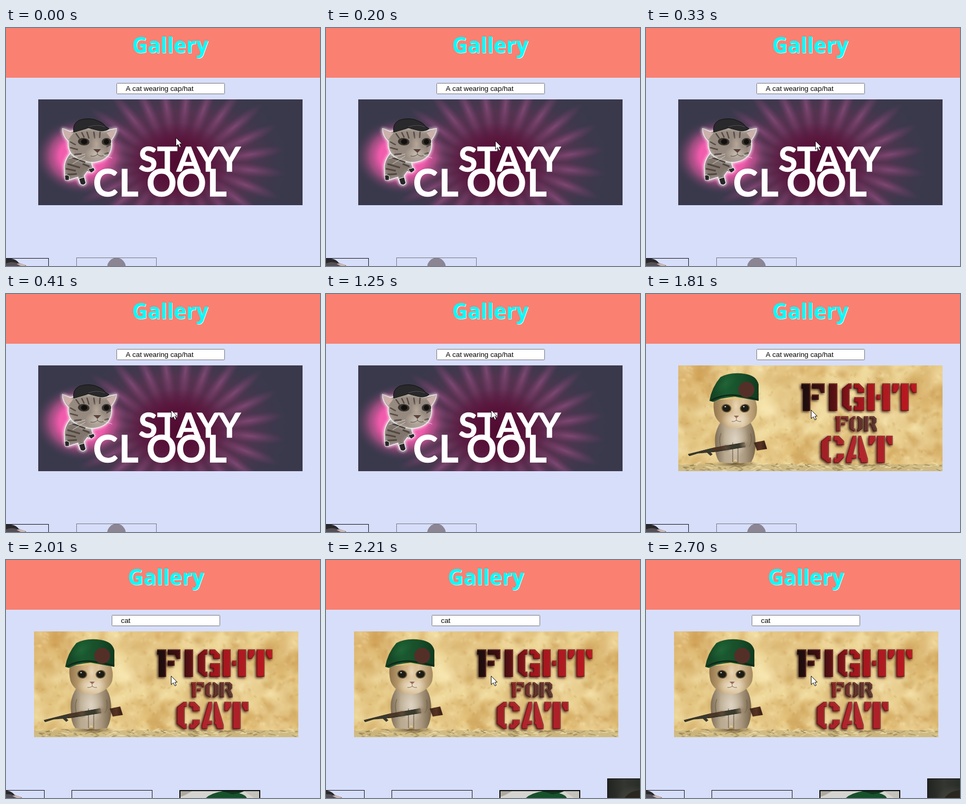
An HTML page with a canvas that plays this animation: 594x450 px, repeating every 3020 ms.

```html
<!DOCTYPE html>
<html lang="en">
<head>
<meta charset="utf-8">
<title>Gallery</title>
<style>
html, body { margin: 0; width: 100%; height: 100%; overflow: hidden; background: #d7defa; }
canvas { display: block; }
</style>
</head>
<body>
<canvas id="stage" width="594" height="450"></canvas>
<script>
const ctx = document.getElementById('stage').getContext('2d');
const LOOP = 3020;
const STEPS = [0, 200, 410, 1810, 2010, 2210];

function shape(d, fill, stroke, width = 1) {
  const path = new Path2D(d);
  if (fill) { ctx.fillStyle = fill; ctx.fill(path); }
  if (stroke) { ctx.strokeStyle = stroke; ctx.lineWidth = width; ctx.stroke(path); }
}

function oval(x, y, rx, ry, fill, angle = 0) {
  ctx.beginPath();
  ctx.ellipse(x, y, rx, ry, angle, 0, Math.PI * 2);
  ctx.fillStyle = fill;
  ctx.fill();
}

function rect(x, y, w, h, fill) {
  ctx.fillStyle = fill;
  ctx.fillRect(x, y, w, h);
}

// Soft ellipse whose colour fades along the given stops
function glow(x, y, rx, ry, stops, angle = 0) {
  ctx.save();
  ctx.translate(x, y);
  ctx.rotate(angle);
  ctx.scale(rx, ry);
  const g = ctx.createRadialGradient(0, 0, 0, 0, 0, 1);
  stops.forEach(([at, colour]) => g.addColorStop(at, colour));
  oval(0, 0, 1, 1, g);
  ctx.restore();
}

// Glow of one "r,g,b" tone that fades to nothing
function haze(x, y, rx, ry, tone, alpha, angle = 0) {
  glow(x, y, rx, ry, [[0, `rgba(${tone},${alpha})`], [1, `rgba(${tone},0)`]], angle);
}

function blend(x0, x1, ...colours) {
  const g = ctx.createLinearGradient(x0, 0, x1, 0);
  colours.forEach((c, i) => g.addColorStop(i / (colours.length - 1), c));
  return g;
}

function clipped(x, y, w, h, draw) {
  ctx.save();
  ctx.beginPath();
  ctx.rect(x, y, w, h);
  ctx.clip();
  draw();
  ctx.restore();
}

function seeded(seed) {
  return () => (seed = (seed * 16807) % 2147483647) / 2147483647;
}

function tabby() {
  const head = 'M122 196L107 190Q107 204 118 214Q116 232 128 242Q144 254 166 254Q186 252 195 239Q202 226 199 212Q208 201 209 190L186 195Q154 184 122 196Z';
  const body = 'M124 234Q108 251 111 270Q110 284 117 288L136 282L139 293Q145 300 151 294L148 279L154 271Q161 276 168 268Q159 260 164 247Z';
  ctx.save();
  ctx.shadowColor = '#fff';
  ctx.shadowBlur = 6;
  shape(body, '#80766e', '#eee', 1.5);
  shape(head, '#96897f', '#eee', 1.5);
  ctx.restore();
  shape('M116 257L140 264M113 266L132 270M125 245L150 254M116 277L134 276M145 257L158 262', null, '#51473f', 3);
  shape('M107 190Q108 203 118 211L127 199ZM209 190Q207 202 199 210L190 198Z', '#cbb0aa');
  shape('M132 199L139 209M143 197L148 207M153 196L157 209M166 196L168 209M178 196L177 208M121 215L132 221M121 226L136 230M129 239L143 238M198 220L190 225M194 236L186 238', null, '#554b45', 2.5);
  haze(171, 238, 22, 16, '205,194,182', .9);
  haze(171, 220, 11, 18, '186,170,156', .9);
  oval(147, 215, 11, 7, '#3b342f', .1);
  oval(190, 215, 9, 7, '#3b342f', -.1);
  oval(148, 215, 6, 5, '#11100f');
  oval(190, 215, 5, 5, '#11100f');
  shape('M165 229L180 229L173 236Z', '#59413c');
  shape('M173 236V239Q167 244 160 242M173 239Q179 244 185 241', null, '#5a4d45', 1);
  shape('M150 238L119 247M150 242L126 257M184 240L201 246', null, '#eee', .7);
  shape('M111 279Q116 276 120 281L119 288L112 288ZM138 285L148 282L151 293Q147 299 141 295ZM155 267L166 264L168 269L161 274Z', '#282629', '#eee', 1);
  shape('M128 197Q125 181 139 174Q159 168 175 176Q185 180 188 186L195 190Q190 196 176 194L156 189Z', '#29282a', '#111', 1);
  shape('M156 187Q172 181 187 187', null, '#535055', 1);
}

function partyBanner() {
  rect(61, 135, 500, 200, '#3a394c');
  glow(325, 257, 215, 165, [[0, '#581239'], [.3, '#5e2449'], [.6, 'rgba(92,50,82,.75)'], [1, 'rgba(58,57,76,0)']]);
  const rays = 24;
  for (let i = 0; i < rays; i++) {
    const a = (i + .4) * Math.PI * 2 / rays;
    glow(325 + Math.cos(a) * 138, 257 + Math.sin(a) * 112, 68, 13,
      [[0, 'rgba(160,86,142,.58)'], [.5, 'rgba(140,72,122,.32)'], [1, 'rgba(120,60,100,0)']], a);
  }
  glow(325, 257, 95, 78, [[0, '#500b31'], [.5, 'rgba(86,14,54,.75)'], [1, 'rgba(86,14,54,0)']]);
  glow(145, 242, 92, 74, [[0, '#ff67b8'], [.48, '#ef5aab'], [.68, 'rgba(190,83,145,.72)'], [1, 'rgba(58,57,76,0)']]);
  tabby();
  ctx.fillStyle = ctx.strokeStyle = '#fff';
  ctx.lineWidth = 1.5;
  const letters = (word, size, y, xs) => [...word].forEach((c, i) => {
    ctx.font = `bold ${size}px Lato, sans-serif`;
    ctx.fillText(c, xs[i], y);
    ctx.strokeText(c, xs[i], y);
  });
  letters('STAYY', 64, 271, [251, 286, 323, 362, 402]);
  letters('CLOOL', 70, 318, [165, 214, 266, 322, 381]);
}

const STENCIL = {
  F: 'M0 0H17V52H3V10H0ZM20 0H44V18H37L34 10H20ZM20 21H33V31H20Z',
  I: 'M0 0H16V52H0Z',
  G: 'M18 0V10H14V42H18V52H12L0 42V10L12 0ZM22 0H32L42 10V18H29V10H22ZM23 26H42V52H22V42H29V36H23Z',
  H: 'M0 0H15V52H0ZM29 0H44V52H29ZM18 21H26V31H18Z',
  T: 'M16 0H31V52H16ZM0 0H13V9L7 18H0ZM34 0H46V18H39L34 9Z',
  O: 'M19 0H13L0 10V42L13 52H19V42H15V10H19ZM25 0H31L44 10V42L31 52H25V42H29V10H25Z',
  R: 'M0 0H15V52H0ZM19 0H34L43 8V20L37 27L44 42V52H32L24 31H19V22H29V10H19Z',
  C: 'M19 0V10H15V42H19V52H13L0 42V10L13 0ZM24 0H34L44 10V18H30V10H24ZM24 42H30V34H44V42L34 52H24Z',
  A: 'M13 0H20V12L14 36H20V44H12L11 52H0V44ZM24 0H29L42 44V52H29L27 44H24V36H25L24 30Z'
};

function stencil(word, xs, y, size, fill) {
  [...word].forEach((c, i) => {
    const path = new Path2D();
    path.addPath(new Path2D(STENCIL[c]), new DOMMatrix([size, 0, 0, size, xs[i], y]));
    ctx.save();
    ctx.shadowColor = 'rgba(35,12,8,.9)';
    ctx.shadowBlur = 5;
    ctx.shadowOffsetX = -2;
    ctx.shadowOffsetY = 2;
    ctx.fillStyle = fill;
    ctx.fill(path);
    ctx.restore();
    ctx.save();
    ctx.clip(path);
    ctx.lineWidth = 3;
    ctx.strokeStyle = 'rgba(50,5,8,.45)';
    ctx.stroke(path);
    ctx.translate(-1, 1);
    ctx.lineWidth = 1;
    ctx.strokeStyle = 'rgba(255,145,130,.4)';
    ctx.stroke(path);
    ctx.restore();
  });
}

function parchment() {
  const rnd = seeded(83);
  rect(61, 135, 500, 200, '#ecd493');
  haze(75, 150, 110, 60, '190,124,40', .6);
  haze(290, 145, 120, 35, '196,136,52', .5);
  haze(545, 180, 70, 80, '198,140,58', .5);
  haze(490, 300, 110, 45, '204,148,66', .45);
  haze(260, 290, 90, 45, '208,156,76', .4);
  haze(430, 235, 120, 45, '252,238,190', .6);
  haze(250, 215, 55, 60, '252,238,190', .5);
  for (let i = 0; i < 900; i++) {
    const x = 61 + rnd() * 500, y = 135 + rnd() * 200;
    const size = 3 + rnd() ** 3 * 24;
    const tone = rnd() < .5 ? '188,134,56' : '252,238,190';
    haze(x, y, size * 1.6, size, tone, .25, rnd() * 3);
  }
  rect(61, 322, 500, 13, 'rgba(196,178,128,.65)');
  for (let i = 0; i < 160; i++) {
    oval(61 + rnd() * 500, 320 + rnd() * 14, 2 + rnd() * 6, .5 + rnd(),
      i % 2 ? 'rgba(140,118,72,.55)' : 'rgba(236,222,172,.7)', rnd() - .5);
  }
}

function soldierCat() {
  haze(169, 321, 45, 6, '65,45,25', .7);
  shape('M140 244Q128 264 131 286Q130 306 139 318L164 320L169 312L176 320L199 318Q208 303 207 280Q207 258 198 244Z', blend(130, 208, '#7c6c56', '#b9a98f', '#c4b59e', '#a8967c', '#75634b'));
  haze(169, 275, 25, 34, '226,216,199', .85);
  shape('M164 281V318M174 283V318M142 263Q136 278 143 294M198 264Q202 279 195 289', null, 'rgba(112,94,70,.6)', 2);
  shape('M129 200Q126 213 130 229Q136 245 154 251Q169 257 187 250Q205 242 209 228Q212 212 206 198Z', blend(129, 211, '#94774e', '#cfb182', '#dcc59d', '#a4875b'));
  haze(170, 238, 28, 17, '240,230,212', .9);
  haze(170, 212, 9, 20, '238,222,190', .8);
  for (const [x, turn] of [[152, .2], [187, -.2]]) {
    oval(x, 216, 9.5, 8, '#6f5b3d', turn);
    oval(x, 216, 7.5, 6.5, '#1c1b15', turn);
    oval(x - 2, 213, 1.5, 1.2, '#cfd5c6');
  }
  shape('M166 230H176L171 235Z', '#9c665a');
  shape('M171 235V239Q166 242 162 241M171 239Q176 242 180 241', null, '#836a50', 1);
  shape('M120 202Q124 177 141 157Q161 147 187 151Q209 154 213 171V202Q189 198 168 194Q142 196 127 204Z', blend(120, 213, '#123f21', '#1a5a30', '#174f2a', '#103a1f'));
  haze(150, 170, 26, 12, '42,110,62', .5, -.6);
  shape('M123 201Q149 188 174 192Q196 195 213 200', null, '#10281a', 3);
  oval(190, 181, 15, 15, '#542f28');
  shape('M80 303L128 291L186 281L188 289L132 298L98 301L82 306Z', '#3c3b2d', '#24261e');
  shape('M123 292L152 286L155 291L130 298Z', '#4d3526');
  shape('M112 297L122 306L126 303L119 296', '#3a382e');
  shape('M204 281L224 277L229 293L210 296Z', blend(204, 229, '#3d261c', '#593422', '#321b12'));
  haze(152, 291, 10, 8, '96,80,60', .75);
  haze(188, 285, 12, 9, '150,130,104', .9);
}

function fightBanner() {
  parchment();
  soldierCat();
  stencil('FIGHT', [294, 346, 371, 418, 466], 169, 1, blend(294, 512, '#180d0d', '#4b1013', '#a4151d', '#b01a21', '#bc1720'));
  stencil('FOR', [358, 385, 412], 231, .56, blend(357, 437, '#8a2523', '#67352d', '#55362d'));
  stencil('CAT', [331, 378, 421], 268, .99, blend(330, 467, '#9e2025', '#b5262d', '#aa1e26'));
}

function frame(x, y, colour, width = 1, w = 153) {
  ctx.strokeStyle = colour;
  ctx.lineWidth = width;
  ctx.strokeRect(x + width / 2, y + width / 2, w - width, 160);
}

function thumbnails(searched, last) {
  const right = searched ? 73 : 81;
  clipped(0, 436, right - 1, 14, () => {
    ctx.translate(right - 81, 0);
    shape('M0 436Q17 434 24 444L38 449V452H0Z', '#29292b');
    shape('M0 445Q13 440 24 446L38 451H0Z', '#555056');
    shape('M20 446Q29 443 38 450H28Z', '#c9b5b3');
  });
  frame(right - 153, 435, '#10101a');
  if (!searched) {
    clipped(134, 435, 150, 15, () => oval(209, 452, 17.5, 17.5, '#8b8594'));
    frame(133, 434, '#777681', 1, 152);
    return;
  }
  frame(124, 435, '#10101a');
  clipped(330, 437, 149, 13, () => {
    rect(329, 436, 151, 14, '#d5d4cf');
    shape('M330 437H352L340 444L330 448Z', '#aaa9a2');
    shape('M376 452Q386 441 410 437H450L441 441Q456 445 456 452Z', '#17512b');
    shape('M408 437H450Q442 441 428 443Z', '#12331e');
    shape('M450 437H480V450H470Z', '#c3c2bb');
  });
  frame(328, 435, '#080808', 2);
  if (last) {
    rect(532, 413, 62, 37, blend(532, 594, '#20231f', '#343630', '#292d28'));
    haze(580, 449, 30, 23, '72,71,62', 1);
    shape('M565 450Q573 437 594 435V450Z', '#2a2721');
    frame(532, 413, '#080808');
  }
}

function cursor(x, y) {
  ctx.save();
  ctx.translate(x + .5, y + .5);
  shape('M0 0V16L4 12.5L7 18.5L9.5 17.5L7 11.5H11.5Z', '#fff', '#111');
  ctx.restore();
}

function render(step) {
  const fight = step >= 3, searched = step >= 4;
  const shift = searched ? -8 : 0;
  rect(0, 0, 594, 450, '#d7defa');
  rect(0, 0, 594, 94, '#fa8072');

  ctx.font = 'bold 40.5px "Open Sans", "Noto Sans", sans-serif';
  ctx.textAlign = 'center';
  ctx.fillStyle = '#d8f8f8';
  ctx.fillText('Gallery', 311.5 + shift, 47.5);
  ctx.fillStyle = '#0ff';
  ctx.fillText('Gallery', 310.5 + shift, 47);
  ctx.textAlign = 'left';

  const field = searched ? 200 : 209;
  ctx.beginPath();
  ctx.roundRect(field + .5, 104.5, 204, 20, 1);
  ctx.fillStyle = '#fff';
  ctx.fill();
  ctx.strokeStyle = '#767676';
  ctx.lineWidth = 1;
  ctx.stroke();
  ctx.font = '13.333px "Liberation Sans", Arial, sans-serif';
  ctx.fillStyle = '#000';
  ctx.fillText(searched ? 'cat' : 'A cat wearing cap/hat', field + 17.5, 119);

  ctx.save();
  ctx.translate(shift, 0);
  clipped(61, 135, 500, 200, fight ? fightBanner : partyBanner);
  ctx.restore();

  thumbnails(searched, step === 5);
  const [x, y] = [[321, 207], [320, 213], [312, 219]][Math.min(step, 2)];
  cursor(x, y);
}

let shown = -1;
function tick() {
  const t = performance.now() % LOOP;
  const step = STEPS.findLastIndex(start => t >= start);
  if (step !== shown) render(shown = step);
  requestAnimationFrame(tick);
}
tick();
</script>
</body>
</html>
```
